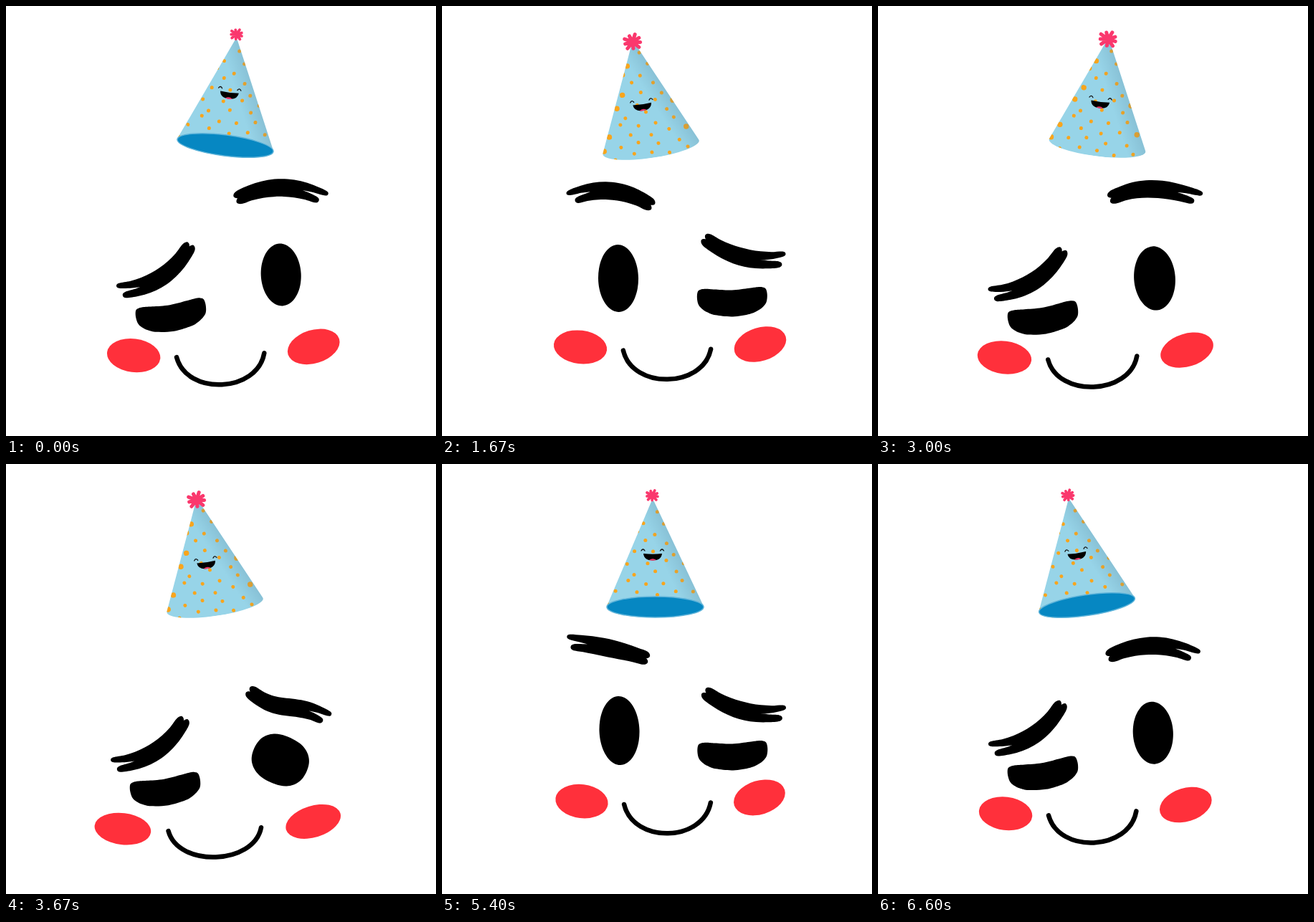
An HTML page that plays this animation: 600 by 600 pixels, repeating every 6630 ms.

```html
<!DOCTYPE html>
<html lang="en">
<head>
<meta charset="utf-8">
<title>Winking party face</title>
<style>
  html, body { margin: 0; width: 100%; height: 100%; overflow: hidden; background: #fff; }
  svg { display: block; width: 100vw; height: 100vh; }
</style>
</head>
<body>
<svg viewBox="0 0 600 600">
  <defs>
    <linearGradient id="shade" gradientUnits="userSpaceOnUse" x1="12" y1="-60" x2="38" y2="-72">
      <stop offset="0" stop-color="#57839a" stop-opacity="0"/>
      <stop offset="1" stop-color="#57839a" stop-opacity=".26"/>
    </linearGradient>
    <clipPath id="cone"><path d="M-5 -148H-2L68 0A68 15 0 0 1 -68 0Z"/></clipPath>
  </defs>
  <g id="hat"></g>
  <path class="brow"/><path class="brow"/>
  <path class="eye"/><path class="eye"/>
  <path id="mouth" fill="none" stroke="#000" stroke-width="6.5" stroke-linecap="round"/>
  <ellipse class="cheek" fill="#ff303b"/><ellipse class="cheek" fill="#ff303b"/>
</svg>
<script>
const LOOP = 6630, FACE_FRAMES = 83, HAT_HOLD = 5.1;
const $ = s => document.querySelector(s), all = s => [...document.querySelectorAll(s)];
const { sin, cos, abs, sign, hypot, PI } = Math;
const range = (n, f) => Array.from({ length: n }, (_, i) => f(i));

// ---- helpers ----
function place([x, y], cx, cy, deg) {
  const c = cos(deg * PI / 180), s = sin(deg * PI / 180);
  return [cx + x * c - y * s, cy + x * s + y * c];
}

function mix(a, b, k) {
  if (typeof a === 'number') return a + (b - a) * k;
  if (Array.isArray(a)) return a.map((v, i) => mix(v, b[i], k));
  return Object.fromEntries(Object.keys(a).map(key => [key, mix(a[key], b[key], k)]));
}

// closed smooth curve through the points
function smooth(p) {
  const at = i => p[(i + p.length) % p.length];
  return `M${p[0]}` + p.map((b, i) => {
    const a = at(i - 1), c = at(i + 1), e = at(i + 2);
    return `C${b[0] + (c[0] - a[0]) / 6} ${b[1] + (c[1] - a[1]) / 6} ` +
           `${c[0] - (e[0] - b[0]) / 6} ${c[1] - (e[1] - b[1]) / 6} ${c}`;
  }).join('') + 'Z';
}

// ---- face parts ----
// A brow is two overlapping tapered strands; their outer tips form the split tail.
function browPath(face, [dx, dy, len, deg, bend, wave], side) {
  const point = (t, off) => {
    const s = side * (2 * t - 1), slope = -2 * bend * s + wave * PI * cos(PI * s);
    const x = s * len / 2, y = bend * (1 - s * s) + wave * sin(PI * s);
    const k = off / hypot(slope, len / 2);
    return place([x - slope * k, y + len / 2 * k], face.x + dx, face.y + dy, deg);
  };
  const strand = (dir, start) => {
    const times = range(8, i => start + (1 - start) * i / 7);
    const offset = t => dir * (4.5 + 2.5 * (1 - t) ** 2);
    const half = t => 3.5 + 1.5 * t + 3 * sin(PI * t);
    const edge = d => times.map(t => point(t, offset(t) + d * half(t)));
    return smooth([
      ...edge(-1), point(1 + 5 / len, offset(1)),
      ...edge(1).reverse(), point(start - 3.5 / len, offset(start))
    ]);
  };
  return strand(-1, 0) + strand(1, .06);
}

// Wide flat eyes turn into bent beans, tall ones stay ovals.
function eyePath(face, [dx, dy, rx, ry, deg, bend]) {
  const power = Math.min(1, .4 + .55 * ry / rx);
  const round = v => sign(v) * abs(v) ** power;
  return smooth(range(20, i => {
    const a = i * PI / 10, u = round(cos(a));
    return place([rx * u, ry * round(sin(a)) + bend * (.5 - u * u)], face.x + dx, face.y + dy, deg);
  }));
}

function mouthPath({ x, y, half, tilt }) {
  const w = half * .487, depth = 41 * 126 / half * 4 / 3;
  const [a, b, c, d] = [[-w, 0], [12 - w, depth], [w - 12, depth], [w, 0]]
    .map(p => place(p, x - 4.5, y + 5.7, tilt));
  return `M${a}C${b} ${c} ${d}`;
}

// ---- poses ----
// x, y, half, tilt: middle between the cheeks, half their distance, their slope
// brow: [dx, dy, length, angle, bend, wave]   eye: [dx, dy, rx, ry, angle, bend]
const winkLeft = (lift = 0) => ({
  brow: [-97, -114.5 + lift, 114, -32 + lift * .65, 15, 0], eye: [-73, -51, 49.5, 18.5, -9.5, 10]
});
const winkRight = { brow: [104.5, -134.5, 111, 14, 11.5, 0], eye: [86.5, -64, 49, 18.5, -2, 10] };

const leftWink = {
  x: 303.7, y: 481.5, half: 125.7, tilt: -2.8, left: winkLeft(),
  right: { brow: [80, -214, 118, 0, -14, 0], eye: [80, -106.5, 28, 43.5, -3, 0] }
};
const sinking = {
  x: 295.8, y: 504, half: 133, tilt: -2.2, left: winkLeft(),
  right: { brow: [99, -167.5, 112, 19, 3, -4], eye: [87, -91, 40, 34, 25, 0] }
};
const deepDip = { x: 290, y: 522, half: 140, tilt: -2, left: winkLeft(), right: winkRight };
const rightWink = {
  x: 318.5, y: 475.7, half: 127, tilt: -.6, right: winkRight,
  left: { brow: [-78.5, -215, 113, -6.6, -13.5, 0], eye: [-71.5, -102, 28, 54, 0, 0] }
};
const rightRest = {
  x: 318.5, y: 474, half: 125.5, tilt: -.9, right: winkRight,
  left: { brow: [-83.5, -202, 110, 5, -14, 0], eye: [-72.5, -94, 28, 47, -1, 0] }
};
const lifted = {
  x: 319, y: 468, half: 124, tilt: -1.2, right: winkRight,
  left: { brow: [-88.5, -208.5, 109, 12, -3, 0], eye: [-71.5, -96, 28, 48, -2, 0] }
};
const landed = {
  x: 304, y: 500, half: 134, tilt: -.5, left: winkLeft(10),
  right: { brow: [96, -232.5, 126, 2, -4.5, 4.5], eye: [91, -101, 32, 49, -8, 0] }
};

const inOut = k => k * k * (3 - 2 * k);
const speedUp = k => k ** 3;
const slowDown = k => 1 - (1 - k) ** 2;
const settle = k => 1 - (1 - k) ** 1.5;

const KEYS = [
  [0, leftWink],
  [8, sinking, speedUp],
  [12.5, deepDip, slowDown],
  [23, rightWink, slowDown],
  [28, { ...rightWink, x: 322 }, inOut],
  [41, rightRest, inOut],
  [46, { ...rightRest, y: 479, half: 130 }, inOut],
  [52, lifted, inOut],
  [57.5, { ...landed, y: 503, half: 136 }, inOut],
  [60, landed, inOut],
  [FACE_FRAMES, leftWink, settle]
];

const brows = all('.brow'), eyes = all('.eye'), cheeks = all('.cheek'), mouth = $('#mouth');

function drawFace(frame) {
  const i = KEYS.findIndex(key => key[0] > frame);
  const [from, a] = KEYS[i - 1], [to, b, ease] = KEYS[i];
  const face = mix(a, b, ease((frame - from) / (to - from)));
  [face.left, face.right].forEach((part, j) => {
    const side = j ? -1 : 1;
    brows[j].setAttribute('d', browPath(face, part.brow, side));
    eyes[j].setAttribute('d', eyePath(face, part.eye));
    const [cx, cy] = place([-side * face.half, 0], face.x, face.y, face.tilt);
    cheeks[j].setAttribute('rx', face.half * .297);
    cheeks[j].setAttribute('ry', 23.2 * 126 / face.half);
    cheeks[j].setAttribute('transform', `translate(${cx} ${cy}) rotate(${j ? -17 : 7})`);
  });
  mouth.setAttribute('d', mouthPath(face));
}

// ---- hat ----
// staggered rows of dots; with the inside hidden, those near the edge are larger
function dots(open) {
  const rows = range(11, row => range(7, col => {
    const y = 8 - row * 14 + 3 * sin(col * 2 + row);
    const x = (col - 3) * 27 + (row % 2) * 13.5 + 3 * sin(row * 2.4 + col);
    const r = !open && abs(x) > .38 * (148 + y) ? 3.7 : 2.5;
    return `<circle cx="${x}" cy="${y}" r="${r}"/>`;
  }));
  return rows.flat().join('');
}

function pompon(y, r, width) {
  const d = range(9, i => {
    const a = (i * 40 + 12) * PI / 180, k = i % 2 ? r : r * .86;
    return `M0 0L${k * cos(a)} ${k * .86 * sin(a)}`;
  }).join('');
  return `<path transform="translate(-4 ${y})" d="${d}" stroke="#fa386d" stroke-width="${width}" stroke-linecap="round"/>`;
}

function hatMarkup(open) {
  const base = '<ellipse rx="67.5" ry="14.5" fill="#0687c2" stroke="#5fb4da" stroke-width="1.5"/>';
  return `<g clip-path="url(#cone)">
      <rect x="-70" y="-150" width="140" height="170" fill="#97d4e8"/>
      <g fill="#f8a51c">${dots(open)}</g>
      <rect x="-70" y="-150" width="140" height="170" fill="url(#shade)"/>
    </g>
    ${open ? base : ''}
    <g transform="translate(-3.5 ${open ? -70.5 : -57.5})">
      <path d="M-13 -4Q0 -2.500 13 -4Q12 5.500 0 5.500Q-12 5.500 -13 -4Z"/>
      <path d="M-5 5Q0 1.500 5 5Q0 6.500 -5 5Z" fill="#f4386c"/>
      <path d="M-16 -8q2.500 -4 5 0M10.500 -8q2.500 -4 5 0" fill="none" stroke="#111" stroke-width="1.3" stroke-linecap="round"/>
    </g>
    ${open ? pompon(-155.5, 8.8, 3.8) : pompon(-149, 12.5, 5)}`;
}

// [x, y, tilt, open]: swings left showing the inside, then back with it hidden
const RIGHT = [306, 194.5, 7.3], MIDDLE = [297.5, 199.5, 0], LEFT = [291.5, 197, -8.3];
const HAT = [
  [...RIGHT, true], [...MIDDLE, true], [...LEFT, true],
  [...LEFT, false], [...MIDDLE, false], [...RIGHT, false]
];
const hat = $('#hat');
hat.innerHTML = HAT.map(([x, y, tilt, open]) =>
  `<g transform="translate(${x} ${y}) rotate(${tilt})">${hatMarkup(open)}</g>`).join('');

function drawHat(index) {
  [...hat.children].forEach((el, i) => el.setAttribute('display', i === index ? 'inline' : 'none'));
}

// ---- clock: 30 pictures a second, the face moving on 25 of them ----
function render(time) {
  const tick = Math.floor((time % LOOP) * .03 + 1e-6);
  drawFace(Math.floor(tick * 5 / 6 + 1e-6) % FACE_FRAMES);
  drawHat(Math.floor(tick / HAT_HOLD + 1e-6) % HAT.length);
}

const start = performance.now();
function loop() {
  render(performance.now() - start);
  requestAnimationFrame(loop);
}
loop();
</script>
</body>
</html>
```
